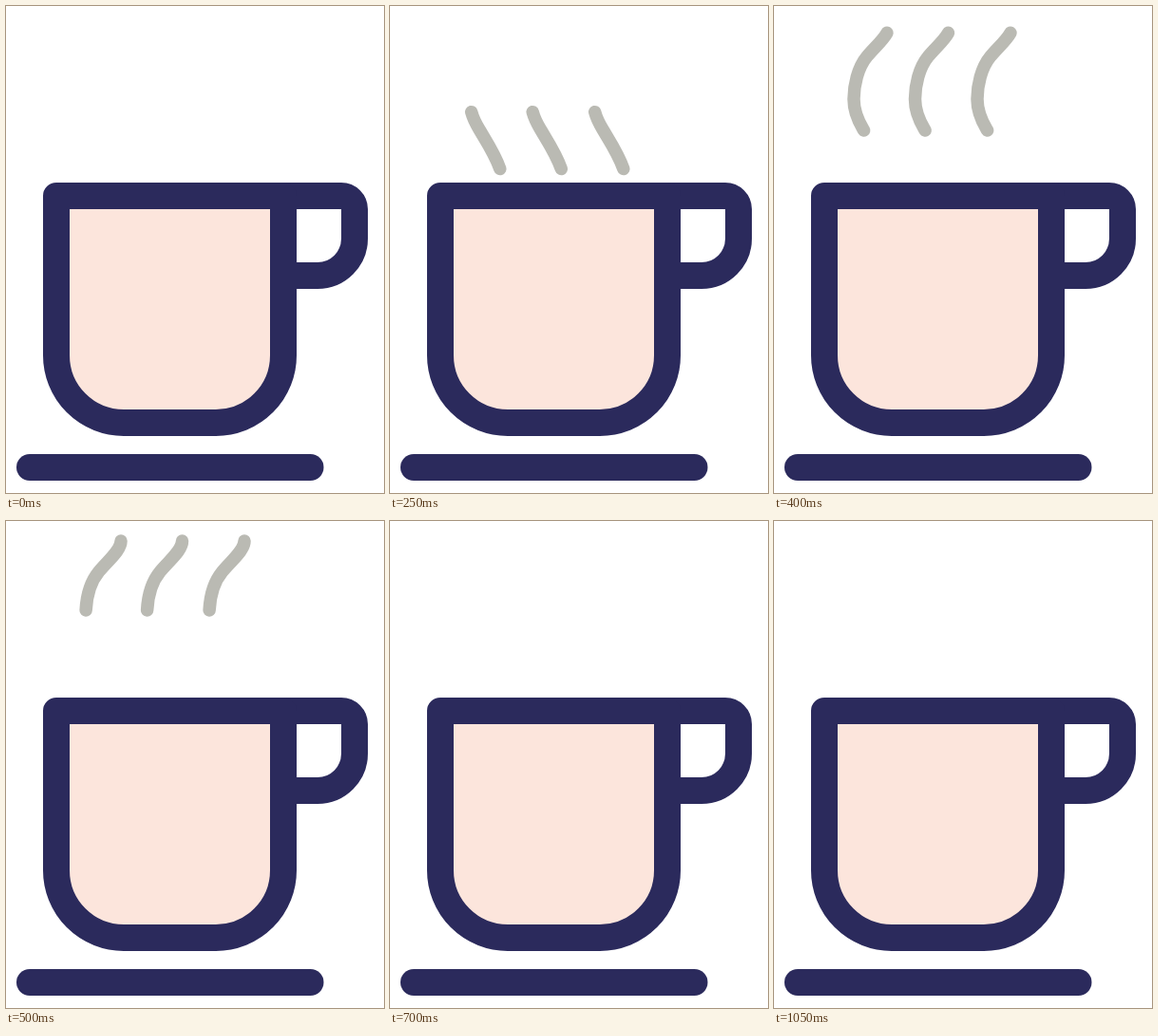
Recreate the animation shown at these times as an HTML page. Size 398 by 513 pixels, loop 1150 ms.

```html
<!DOCTYPE html>
<html lang="en">
<head>
<meta charset="utf-8">
<title>Steaming cup</title>
<style>
  html, body { margin: 0; width: 100%; height: 100%; overflow: hidden; background: #fff; }
  svg { display: block; width: 398px; height: 513px; }
</style>
</head>
<body>
<svg viewBox="0 0 398 513" fill="none" stroke-linejoin="round">
  <defs>
    <path id="wisp" pathLength="1" d="M117 188C117 181 117 176 116 172C111 157 103 145 94 130C88 120 84 111 84 98C84 84 88 65 98 53C108 41 121 31 121 21"/>
  </defs>
  <g id="steam" stroke="#babab3" stroke-width="13.5" stroke-linecap="round">
    <use href="#wisp"/>
    <use href="#wisp" x="64.5"/>
    <use href="#wisp" x="130"/>
  </g>
  <g stroke="#2b2a5c" stroke-width="28">
    <path d="M292 200H353a14 14 0 0 1 14 14V245a39 39 0 0 1 -39 39H292"/>
    <path fill="#fce5dc" d="M53 200V368a71 71 0 0 0 71 71H221a71 71 0 0 0 71 -71V200Z"/>
    <path stroke-linecap="round" d="M25 486H320.5"/>
  </g>
</svg>
<script>
const LOOP = 1150, STEP = 50, RISE = 150;
const steam = document.getElementById('steam');
const wisp = document.getElementById('wisp');

const progress = (t, length) => Math.min(1, Math.max(0, (t - RISE) / length));
const easeOut = (u, power) => 1 - (1 - u) ** power;
const easeIn = (u, power) => u ** power;

// The leading end slows down, the trailing end speeds up behind it.
function draw(now) {
  const t = Math.floor((now % LOOP) / STEP) * STEP;
  const head = easeOut(progress(t, 275), 1.33);
  const tail = easeIn(progress(t, 530), 1.45);
  steam.setAttribute('visibility', t >= RISE && tail < 1 ? 'visible' : 'hidden');
  wisp.setAttribute('stroke-dasharray', Math.max(0.001, head - tail) + ' 3');
  wisp.setAttribute('stroke-dashoffset', -tail);
}

const start = performance.now();
function tick() {
  draw(performance.now() - start);
  requestAnimationFrame(tick);
}
tick();
</script>
</body>
</html>
```
